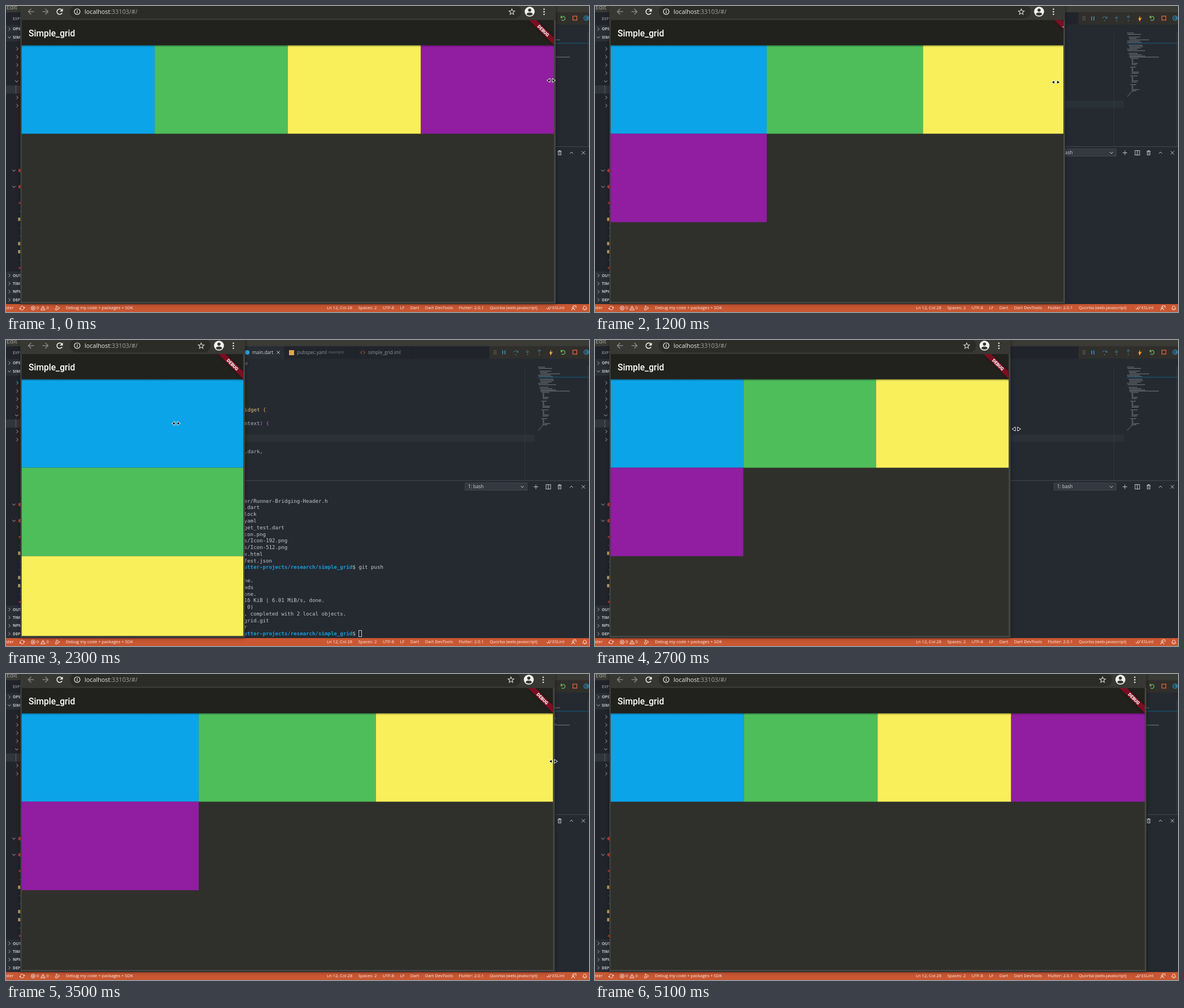
An HTML page with a canvas for the animation above (5300 ms loop, 1032 by 543 pixels).

```html
<!DOCTYPE html>
<html lang="en">
<head>
<meta charset="utf-8">
<title>Responsive grid</title>
<style>
html, body { margin: 0; width: 100%; height: 100%; overflow: hidden; background: #252a31; }
canvas { display: block; }
</style>
</head>
<body>
<canvas id="stage" width="1032" height="543"></canvas>
<script>
const c = document.getElementById('stage').getContext('2d');
const LOOP = 5300, STEP = 100;
const LEFT = 27.5, TOP = 25, BAR = 69.6, TILE = 157, BOTTOM = 525;
const WIDE = 970, NARROW = 420, RELEASE = 3800;
const SANS = '"Open Sans", sans-serif', MONO = '"DejaVu Sans Mono", monospace', APP = 'Roboto, sans-serif';
const TILES = ['#0ca4e8', '#4ebe5a', '#f8ef5a', '#911da1'];

// Motion
const ramp = (t, from, to) => Math.min(1, Math.max(0, (t - from) / (to - from)));
const mix = (a, b, p) => a + (b - a) * p;
const swing = p => (1 - Math.cos(p * Math.PI)) / 2;
const settle = p => 1 - (1 - p) ** 3;

function edgeAt(t) {
  if (t >= RELEASE) return WIDE + 3;
  if (t > 2400) return mix(NARROW, WIDE - 1, settle(ramp(t, 2400, 3626)));
  return mix(WIDE, NARROW, swing(ramp(t, 928, 1733)));
}
// The page layout trails the window while it shrinks.
const layoutAt = t => edgeAt(t < 1600 ? t - 31 : t);

function dragAt(t) {
  const x = t > 2400 ? Math.min(edgeAt(t + 18), WIDE - 1) : mix(965, 301, swing(ramp(t, 892, 1871)));
  return [x, 132 + 16 * ramp(t, 1000, 2000) + 10 * ramp(t, 2400, 2700) - 3 * ramp(t, 2700, 3500)];
}
function pointerAt(t) {
  const p = swing(ramp(t, 4300, 4800));
  return [mix(973, 79, p), mix(211, 7, p)];
}

// Drawing helpers
function box(x, y, w, h, color) {
  c.fillStyle = color;
  c.fillRect(x, y, w, h);
}
function frame(x, y, w, h, color, width = 1) {
  c.strokeStyle = color;
  c.lineWidth = width;
  c.strokeRect(x, y, w, h);
}
function text(s, x, y, size, color, font = SANS, weight = 400) {
  c.font = `${weight} ${size}px ${font}`;
  c.fillStyle = color;
  c.fillText(s, x, y + size * 0.35);
  return x + c.measureText(s).width;
}
function trace(points, close) {
  c.beginPath();
  points.forEach(p => c.lineTo(...p));
  if (close) c.closePath();
}
function line(points, color, width = 1, close = false) {
  trace(points, close);
  c.strokeStyle = color;
  c.lineWidth = width;
  c.stroke();
}
function shape(points, color) {
  trace(points, true);
  c.fillStyle = color;
  c.fill();
}
function dot(x, y, r, color) {
  c.beginPath();
  c.arc(x, y, r, 0, 7);
  c.fillStyle = color;
  c.fill();
}
function arc(x, y, r, color, width = 1, from = 0, to = Math.PI * 2) {
  c.beginPath();
  c.arc(x, y, r, from, to);
  c.strokeStyle = color;
  c.lineWidth = width;
  c.stroke();
}
function chevron(x, y, turn, color = '#a5a9b0') {
  c.save();
  c.translate(x, y);
  c.rotate(turn * Math.PI / 2);
  line([[-1.5, -2.8], [1.5, 0], [-1.5, 2.8]], color);
  c.restore();
}
function cross(x, y, s, color) {
  line([[x - s, y - s], [x + s, y + s]], color);
  line([[x + s, y - s], [x - s, y + s]], color);
}
function arrow(x, y, turn, s, color, width) {
  c.save();
  c.translate(x, y);
  c.rotate(turn * Math.PI / 2);
  line([[-s, 0], [s, 0]], color, width);
  line([[0, -s], [s, 0], [0, s]], color, width);
  c.restore();
}
function reload(x, y, r, color, width) {
  arc(x, y, r, color, width, 0.5, 5.6);
  shape([[x + r + 0.8, y - r - 0.5], [x + r + 0.8, y - 0.2], [x, y - 0.2]], color);
}
function seeded(seed) {
  return () => (seed = seed * 16807 % 2147483647) / 2147483647;
}

// Editor behind the window
function section(label, y, open) {
  box(0, y - 7, 27, 14.4, '#2a2f36');
  chevron(6, y, open ? 1 : 0);
  text(label, 12, y, 7, '#c6c9ce', SANS, 700);
}
function sidebar() {
  const rowY = i => 76 + i * 14.4, OPEN = 4, SELECTED = 5;
  box(0, 11, 27, 518, '#21252b');
  text('Edit', 1, 2, 10.5, '#a9a9a4');
  text('EXPLORER', 12, 22, 7.3, '#b4b8be');
  section('OPEN', 41);
  section('SIMPLE', 55.5, true);
  for (let i = 0; i < 8; i++) {
    if (i !== SELECTED) chevron(i === OPEN ? 19 : 20, rowY(i), i === OPEN ? 1 : 0);
  }
  box(0, rowY(SELECTED) - 7, 27, 14.4, '#30353d');
  box(17, rowY(SELECTED) - 7, 1, 14.4, '#565c66');
  [15, 17].forEach(i => {
    chevron(14, rowY(i), 1);
    dot(25, rowY(i), 3.2, '#c1402f');
  });
  [...'r-y--yy-r'].forEach((kind, i) => {
    const y = rowY(19 + i);
    if (kind === 'r') dot(24.5, y, 2, '#b53a30');
    else if (kind === 'y') box(21.5, y - 3, 4, 6, '#c9a565');
    else box(23, y, 2, 1, '#555a62');
  });
  ['OUTLINE', 'TIMELINE', 'NPM', 'DEPENDENCIES'].forEach((s, i) => section(s, rowY(28) - 1 + i * 14.4));
}

function tabs() {
  const dim = '#8d939c';
  box(27, 11, 1005, 22, '#21252b');
  box(380, 11, 113, 22, '#282d34');
  dot(427, 22, 4, '#2aa4dc');
  text('main.dart', 436, 22, 8.2, '#d5d8dc');
  cross(482, 22, 2.7, '#c4c7cb');
  box(501, 18, 9, 9, '#d9a94e');
  text('pubspec.yaml', 515, 22, 8.2, dim);
  text('example', 571, 22, 6.9, '#666c75');
  chevron(629, 22, 2, '#cb5b3f');
  chevron(634, 22, 0, '#cb5b3f');
  text('simple_grid.iml', 641, 22, 8.2, dim);
  [493, 620, 718].forEach(x => box(x, 11, 1, 22, '#1c2025'));
  text('build', 409, 41, 8, dim);
}

function debugBar() {
  const blue = '#2b9ad6', dim = '#3c6d88', green = '#79c36a', x = i => 881 + 21 * i;
  box(856, 11, 176, 22, '#302f2b');
  for (let i = 0; i < 6; i++) box(863.5 + (i % 2) * 3, 18.5 + (i >> 1) * 2.8, 1.3, 1.3, '#8b8b87');
  [-2.5, 1.5].forEach(d => box(x(0) + d, 18.5, 1.5, 7, blue));
  arc(x(1), 23, 4, dim, 1.1, 3.4, 6.1);
  shape([[907, 18.5], [907, 22.5], [903, 22]], dim);
  arrow(x(2), 20, 1, 2.8, dim, 1.1);
  arrow(x(3), 20, -1, 2.8, dim, 1.1);
  [1, 2, 3].forEach(i => dot(x(i), 26, 1.1, dim));
  shape([[965, 17], [962, 23], [964.5, 22.5]], '#f5a33b');
  shape([[964, 27.5], [968, 20.5], [962, 22.5]], '#f5a33b');
  arc(x(5), 22, 3.6, green, 1.2, 3.6, 8.7);
  line([[982.5, 17.5], [982.5, 21], [986, 21]], green, 1.2);
  frame(x(6) - 3.5, 18, 7, 7, '#ee6a47', 1.2);
  arc(x(7) - 1, 21.5, 4, '#2b9ad6', 1.2);
  arc(x(7), 21.5, 1.8, '#2b9ad6', 1.1);
}

function minimap() {
  const random = seeded(11);
  const row = (indent, y, w, color = '#858a90') => {
    c.setLineDash([2.6, 0.5]);
    line([[941 + indent, y], [941 + indent + w, y]], color, 1);
    c.setLineDash([]);
  };
  for (let i = 0; i < 18; i++) {
    if (i % 6 !== 2) row(1 + (i % 6) * 0.9, 48 + i * 2.4, 12 + random() * 26);
  }
  row(5, 90.7, 52);
  for (let block = 0; block < 4; block++) {
    for (let i = 0; i < 6; i++) {
      row(i ? 9 : 7, 93 + block * 15.5 + i * 2.2, i % 5 === 0 || i === 4 ? 8 + random() * 7 : 3);
    }
  }
  for (let i = 0; i < 5; i++) row(8 - i * 1.7, 152 + i * 2, 1.5);
  box(941, 65.5, 91, 1, '#15607f');
  box(1030, 47, 1, 202, '#3a4048');
}

function editor() {
  box(27, 33, 1005, 496, '#252a31');
  box(27, 168, 909, 12.5, '#2a3238');
  box(918, 48, 1, 201, '#30363d');
  text('{', text('idget ', 422, 124, 9.1, '#e0bb76', MONO), 124, 9.1, '#d7a94f', MONO);
  text(') {', text('ntext', 422, 148, 9.1, '#abb2bf', MONO), 148, 9.1, '#b968c2', MONO);
  text('.dark,', 422, 198, 9.1, '#abb2bf', MONO);
  minimap();
}

function terminal() {
  const ink = '#c0c3c8', y = 260.5;
  box(27, 249, 1005, 1, '#41474f');
  box(812, 254, 111, 13, '#343941');
  frame(812.5, 253.5, 110, 13, '#3e444c');
  text('1: bash', 818, y, 8.2, '#d3d6da');
  chevron(914, y, 1, ink);
  box(934, y - 0.5, 8, 1, ink);
  box(937.5, y - 4, 1, 8, ink);
  frame(956, 256.5, 8, 8, ink);
  box(959.5, 256.5, 1, 8, ink);
  box(976.5, 257.5, 7, 1, ink);
  frame(977.7, 258, 4.6, 6.3, ink);
  box(978.5, 256, 3, 1, ink);
  box(979.6, 259.5, 0.8, 3.5, ink);
  chevron(1001, y, -1, ink);
  cross(1022, y, 3, ink);

  const path = 'utter-projects/research/simple_grid';
  const rows = ['er/Runner-Bridging-Header.h', '.dart', 'lock', 'yaml', 'get_test.dart', 'con.png', 's/Icon-192.png',
    's/Icon-512.png', 'x.html', 'fest.json', '$ git push', '', 'ne.', 'ads', 'one.', '16 KiB | 6.01 MiB/s, done.', ' 0)',
    ', completed with 2 local objects.', 'grid.git', 'r', '$ '];
  let end;
  rows.forEach((s, i) => {
    const rowY = 285.5 + i * 11.775;
    const x = s[0] === '$' ? text(path, 421.6, rowY, 9.1, '#1c9bd8', MONO, 700) : 421.6;
    end = text(s, x, rowY, 9.1, '#c4c7cb', MONO);
  });
  frame(Math.round(end) + 0.5, 515.5, 5, 11, '#c4c7cb');
}

function statusBar() {
  const ink = '#fbefe9', y = 536;
  const label = (s, x) => text(s, x, y - 0.2, 7.6, ink);
  box(0, 529, 1032, 14, '#c95732');
  label('ster', 0);
  [0.2, 3.4].forEach(a => arc(28.5, y, 3.3, ink, 0.9, a, a + 2.5));
  dot(32, 535, 1.2, ink);
  dot(25, 537, 1.2, ink);
  arc(48, y, 3.5, ink, 0.9);
  cross(48, y, 1.5, ink);
  label('0', 54);
  line([[65.5, 532.3], [69.3, 539.3], [61.7, 539.3]], ink, 0.9, true);
  box(65, 535, 0.9, 2.4, ink);
  label('0', 71.5);
  line([[89, 535], [89, 532], [95, 535.8], [91.5, 538]], ink, 0.9);
  arc(89.3, 537.8, 1.9, ink, 0.9);
  label('Debug my code + packages + SDK', 106);

  ['Ln 12, Col 28', 'Spaces: 2', 'UTF-8', 'LF', 'Dart', 'Dart DevTools', 'Flutter: 2.0.1', 'Quorba (web-javascript)']
    .reduce((x, s) => label(s, x) + 10.4, 568);
  [957, 960.5].forEach(x => line([[x, 536.3], [x + 1.7, 538.3], [x + 5, 533]], ink, 0.9));
  label('ESLint', 967);
  arc(1004, 535, 1.5, ink, 0.9);
  arc(1004, 540, 2.9, ink, 0.9, Math.PI, 0);
  line([[1004, 532], [1009, 532], [1009, 536]], ink, 0.9);
  arc(1024.5, 535, 2.5, ink, 0.9, Math.PI, 0);
  line([[1022, 535], [1021, 538], [1028, 538], [1027, 535]], ink, 0.9);
  box(1023.5, 539, 2, 1, ink);
}

// Browser window
function toolbar(right) {
  const y = 10, paper = '#ecece9', panel = '#373733';
  box(LEFT - 2, 0, right - LEFT + 5, TOP, panel);
  c.beginPath();
  c.roundRect(113, -2, right - 171, 24, 12);
  c.fillStyle = '#2b2b28';
  c.fill();
  arrow(44.5, y, 2, 5, '#8b8b87', 1.4);
  arrow(69.5, y, 0, 5, '#8b8b87', 1.4);
  reload(95, y, 4.8, '#f1f1ee', 1.6);
  arc(126, y, 5, paper, 1.2);
  box(125.4, 9.3, 1.3, 3.6, paper);
  box(125.4, 7, 1.3, 1.3, paper);
  text(':33103/#/', text('localhost', 139, y, 10.8, paper), y, 10.8, '#a6a6a2');
  const star = Array.from({ length: 10 }, (_, i) => {
    const a = (i / 5 - 0.5) * Math.PI, r = i % 2 ? 2.4 : 5.4;
    return [right - 74.5 + r * Math.cos(a), y + 0.5 + r * Math.sin(a)];
  });
  line(star, '#d9d9d5', 1.1, true);
  dot(right - 43, y, 8.8, '#f4f4f2');
  dot(right - 43, 7.3, 2.8, panel);
  c.beginPath();
  c.ellipse(right - 43, 14.2, 5.3, 2.8, 0, 0, 7);
  c.fill();
  [-1, 0, 1].forEach(i => dot(right - 17.5, y + 0.2 + i * 4.5, 1.3, paper));
}

function ribbon(right) {
  c.save();
  c.translate(right, TOP);
  c.rotate(Math.PI / 4);
  c.shadowColor = 'rgba(0,0,0,.5)';
  c.shadowBlur = 5;
  box(-31.4, 22, 62.8, 9.4, '#7b0e21');
  c.shadowBlur = 0;
  c.textAlign = 'center';
  text('DEBUG', 0, 26.7, 8, '#fff', APP, 900);
  c.restore();
}

function columnsFor(width) {
  return 1 + [452, 603, 942].filter(limit => width >= limit).length;
}

function browser(right, laid) {
  c.save();
  c.shadowColor = 'rgba(0,0,0,.6)';
  c.shadowBlur = 7;
  box(LEFT - 2, -10, right - LEFT + 5, 538, '#454541');
  c.restore();
  toolbar(right);

  c.save();
  c.beginPath();
  c.rect(LEFT, TOP, right - LEFT, BOTTOM - TOP);
  c.clip();
  box(LEFT, TOP, right - LEFT, BOTTOM - TOP, '#2f302b');
  const width = laid - LEFT, columns = columnsFor(width), w = width / columns;
  TILES.forEach((color, i) => box(LEFT + i % columns * w, BAR + Math.floor(i / columns) * TILE, w, TILE, color));
  const shade = c.createLinearGradient(0, BAR, 0, BAR + 3.5);
  shade.addColorStop(0, 'rgba(0,0,0,.35)');
  shade.addColorStop(1, 'rgba(0,0,0,0)');
  box(LEFT, BAR, width, 3.5, shade);
  box(LEFT, TOP, width, BAR - TOP, '#21221d');
  text('Simple_grid', 40, 48.3, 15.6, '#fff', APP, 500);
  ribbon(laid);
  c.restore();
}

// Cursors
function outlined(points) {
  shape(points, '#000');
  line(points, '#fff', 1, true);
}
function resizeCursor(x, y) {
  [-1, 1].forEach(d => outlined([[x + d * 7.5, y], [x + d * 2, y - 3.5], [x + d * 2, y + 3.5]]));
}
function pointer(x, y) {
  outlined([[0, 0], [0, 13], [3, 10.3], [5, 15], [7.2, 14], [5.2, 9.6], [9.5, 9.4]].map(([a, b]) => [x + a, y + b]));
}

function draw(now) {
  const t = Math.floor(now % LOOP / STEP) * STEP;
  box(0, 0, 1032, 11, '#3a3a36');
  editor();
  tabs();
  debugBar();
  terminal();
  sidebar();
  statusBar();
  browser(edgeAt(t), layoutAt(t));
  if (t < 4200) resizeCursor(...dragAt(t));
  else if (t < 5100) pointer(...pointerAt(t));
}

const start = performance.now();
function tick() {
  draw(performance.now() - start);
  requestAnimationFrame(tick);
}
tick();
</script>
</body>
</html>
```
